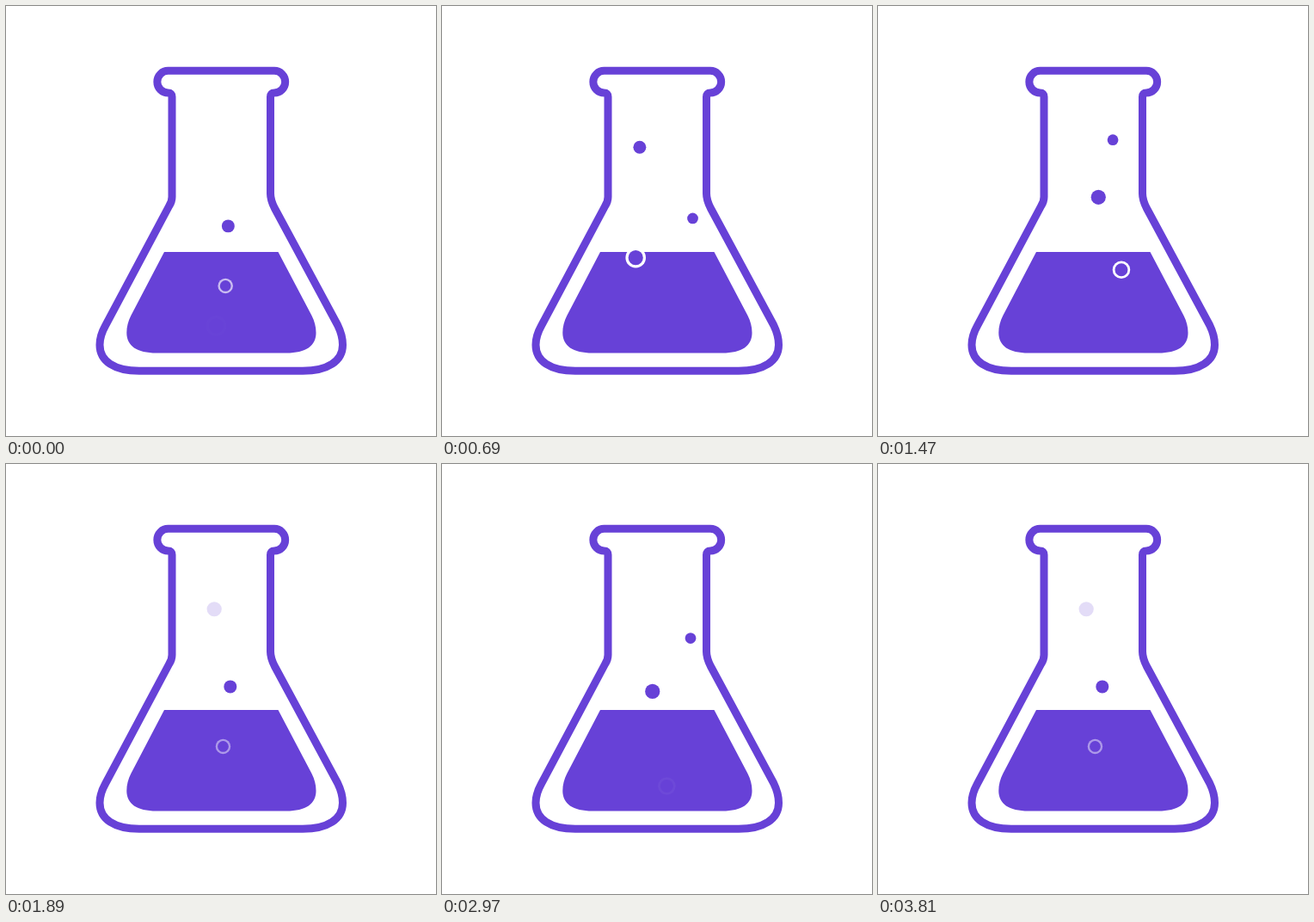
Recreate the animation shown at these times as an HTML page. Size 500 by 500 pixels, loop 3.84 s.

```html
<!DOCTYPE html>
<html lang="en">
<head>
<meta charset="utf-8">
<title>Bubbling flask</title>
<style>
  html, body { margin: 0; width: 100%; height: 100%; overflow: hidden; background: #fff; }
  svg { display: block; width: 100vw; height: 100vh; }
</style>
</head>
<body>
<svg viewBox="0 0 500 500" fill="#6741d7">
  <path fill="none" stroke="#6741d7" stroke-width="9" stroke-linejoin="round"
    d="M188.5 75.3H312A12.6 12.8 0 0 1 312 101Q307.5 101 307.5 105.5V218
       C307.5 224 309.5 229.5 312.3 235L385.6 371C389.5 379 391.5 386 391.5 394
       C391.5 413 374 424.3 345 424.3H155C126 424.3 109 413 109 394
       C109 386 111.5 379 115.4 372L189.7 232.5C192 229 193 226 193 222V105.5
       Q193 101 188.5 101A12.6 12.8 0 0 1 188.5 75.3Z"/>
  <path d="M184 286H316.5L355.5 360C358.7 366 360.5 373 360.5 380
           C360.5 395 349 403.5 326 403.5H175C152 403.5 140.3 395 140.3 380
           C140.3 373 142.1 366 145.3 360Z"/>
  <g id="bubbles"></g>
</svg>
<script>
  const PERIOD = 1920, FADE = 160;

  // Each bubble drifts through a few points, evenly spaced over its life.
  const bubbles = [
    { scale: 1, start: 0, life: 1920,
      points: [[244.5, 372], [228, 336], [226.8, 283.5], [250.3, 257], [255.8, 214.5], [241, 165]] },
    { scale: 0.87, start: 1045, life: 1735,
      points: [[261, 375.5], [283, 317.7], [271.6, 275], [245.4, 238.3], [225.4, 194.2], [238, 134]] },
    { scale: 0.74, start: 1817, life: 1773,
      points: [[246, 336], [275.7, 299.3], [290.2, 257.4], [290.7, 213.4], [280.4, 172], [262.5, 135.5]] }
  ];

  const layer = document.getElementById('bubbles');
  const svgNode = (tag, attrs, parent) => {
    const node = document.createElementNS('http://www.w3.org/2000/svg', tag);
    for (const name in attrs) node.setAttribute(name, attrs[name]);
    return parent.appendChild(node);
  };

  for (const bubble of bubbles) {
    bubble.node = svgNode('g', {}, layer);
    svgNode('circle', { r: 11.8, fill: '#fff' }, bubble.node);
    svgNode('circle', { r: 8.6 }, bubble.node);
  }

  // Catmull-Rom curve; the end points are extended in a straight line.
  function along(points, progress) {
    const last = points.length - 1;
    const i = Math.min(last - 1, Math.floor(progress * last));
    const t = progress * last - i;
    return [0, 1].map(axis => {
      const b = points[i][axis], c = points[i + 1][axis];
      const a = i > 0 ? points[i - 1][axis] : 2 * b - c;
      const d = i + 2 <= last ? points[i + 2][axis] : 2 * c - b;
      return b + t / 2 * (c - a + t * (2 * a - 5 * b + 4 * c - d + t * (3 * (b - c) + d - a)));
    });
  }

  function draw(now) {
    for (const { node, scale, start, life, points } of bubbles) {
      const age = (now + PERIOD - start) % PERIOD;
      const opacity = Math.max(0, Math.min(1, age / FADE, (life - age) / FADE));
      node.setAttribute('opacity', opacity);
      if (opacity > 0) {
        node.setAttribute('transform', `translate(${along(points, age / life)}) scale(${scale})`);
      }
    }
  }

  const began = performance.now();
  function tick() {
    draw(performance.now() - began);
    requestAnimationFrame(tick);
  }
  tick();
</script>
</body>
</html>
```
